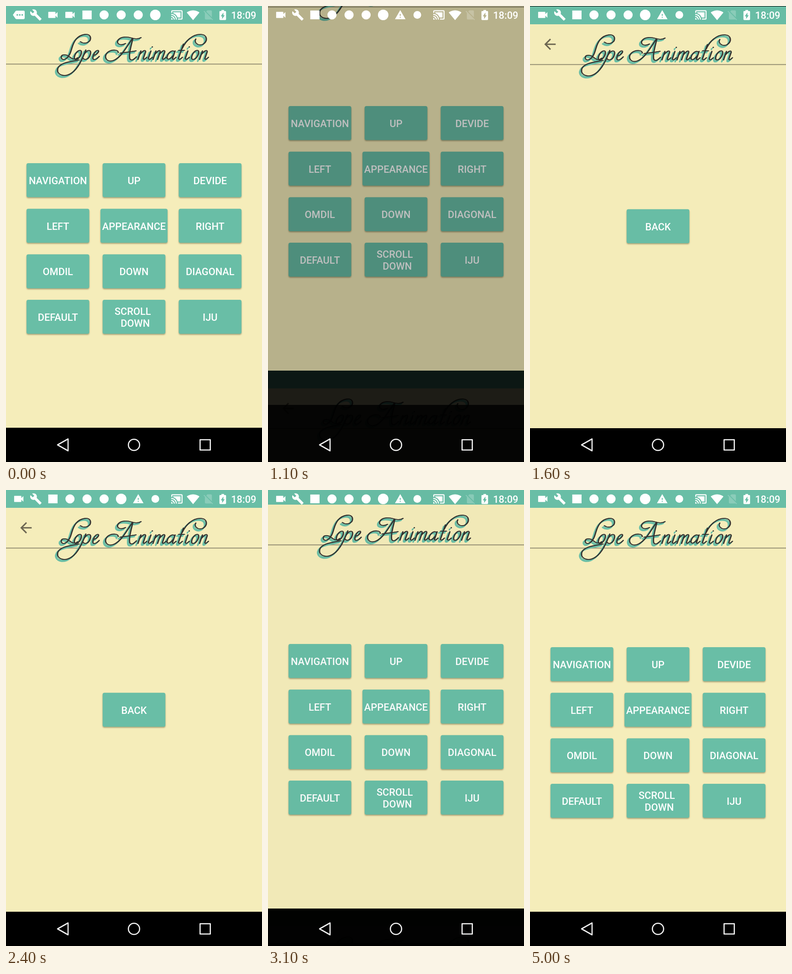
Animation of 561 by 998 pixels, one loop 5.1 s. Source, as an HTML page with a canvas:

```html
<!DOCTYPE html>
<html lang="en">
<head>
<meta charset="utf-8">
<title>Slide transition</title>
<style>
  html, body { margin: 0; width: 100%; height: 100%; overflow: hidden; background: #000; }
  canvas { display: block; width: 561px; height: 998px; }
</style>
</head>
<body>
<canvas id="stage" width="561" height="998"></canvas>
<script>
const W = 561, H = 998, NAV_Y = 923, LOOP = 5100, STEP = 100;
const CREAM = '#f5edba', TEAL = '#69bea6', INK = '#343230';
const FONT = '500 21.8px Roboto, sans-serif';
const stage = document.getElementById('stage').getContext('2d');

const ICONS = {
  video: 'M17 10.5V7c0-.55-.45-1-1-1H4c-.55 0-1 .45-1 1v10c0 .55.45 1 1 1h12c.55 0 1-.45 1-1v-3.5l4 4v-11z',
  tool: 'M22.7 19l-9.1-9.1c.9-2.3.4-5-1.5-6.9-2-2-5-2.4-7.4-1.3L9 6 6 9 1.6 4.7C.4 7.1.9 10.1 2.9 12.1c1.9 1.9 4.6 2.4 6.9 1.5l9.1 9.1c.4.4 1 .4 1.4 0l2.3-2.3c.5-.4.5-1.1.1-1.4z',
  more: 'M22 3.5H7L5.4 4.4 0 12l5.4 7.6 1.6.9H22q2 0 2-2v-13q0-2-2-2zM7.5 10.5h3v3h-3zM12.5 10.5h3v3h-3zM17.5 10.5h3v3h-3z',
  warn: 'M1 21h22L12 2zM13 18h-2v-2h2zM13 14h-2v-4h2z',
  square: 'M3 3.5H21V20.5H3z',
  cast: 'M21 3H3c-1.1 0-2 .9-2 2v3h2V5h18v14h-7v2h7c1.1 0 2-.9 2-2V5c0-1.1-.9-2-2-2zM1 18v3h3c0-1.66-1.34-3-3-3zM1 14v2c2.76 0 5 2.24 5 5h2c0-3.87-3.13-7-7-7zM1 10v2c4.97 0 9 4.03 9 9h2c0-6.08-4.93-11-11-11zM19 7H5v1.63c3.96 1.28 7.09 4.41 8.37 8.37H19z',
  wifi: 'M12 21.5L23.6 7C23.2 6.7 18.7 3 12 3S.8 6.7.4 7z',
  noSim: 'M19 5c0-1.1-.9-2-2-2h-7L7.66 5.34 19 16.68zM3.65 3.88L2.38 5.15 5 7.77V19c0 1.1.9 2 2 2h10l1-.26 1.88 1.88 1.27-1.27z',
  battery: 'M15.7 4H14V2h-4v2H8.3Q7 4 7 5.3v15.4Q7 22 8.3 22h7.4Q17 22 17 20.7V5.3Q17 4 15.7 4zM11 20v-5.5H9L13 7v5.5h2z',
  arrow: 'M20 11H7.83l5.59-5.59L12 4l-8 8 8 8 1.41-1.41L7.83 13H20z'
};
for (const k in ICONS) ICONS[k] = new Path2D(ICONS[k]);

// Script letters: upright, baseline at 0, slanted when drawn
const SCRIPT = {
  o: 'M8-20C-1-20-2 0 6 0C15 0 16-20 8-20',
  e: 'M1-9C10-10 12-20 7-20C0-20-1 0 6 0C10 0 13-3 15-7',
  n: 'M0 0V-19M0-11C3-18 9-23 11-17V-4C11 1 14 1 18-5',
  i: 'M2-19V-4C2 1 6 1 10-5M2-27V-28',
  m: 'M0 0V-19M0-11C3-18 8-23 10-17V0M10-11C13-18 18-23 20-17V-4C20 1 23 1 27-5',
  a: 'M14-17C5-23 0-13 1-6C2 2 9 1 14-10M14-19V-4C14 1 17 1 21-5',
  t: 'M4-34V-4C4 1 8 1 12-5M-2-20H11'
};
const WORD = [['o', 147], ['e', 187], ['n', 289], ['i', 309], ['m', 322],
              ['a', 350], ['t', 373], ['i', 390], ['o', 404], ['n', 424]];
const SWASHES = [
  // L
  'M163 78C173 85 187 79 185 68C182 58 164 61 154 72C143 85 145 98 138 108C133 117 123 120 121 113C120 105 131 105 139 111C146 117 152 118 157 113',
  // p
  'M175 96C168 114 158 138 143 147C130 156 111 152 113 138C116 124 140 122 160 118M171 106C178 94 188 95 185 105C182 117 172 120 168 113',
  // A
  'M262 82C250 88 240 82 246 74C252 66 266 67 276 70C285 73 291 72 296 69M277 71C265 88 254 110 238 118C222 126 212 112 222 102C231 94 246 95 246 102M278 71C274 88 269 104 271 115C274 121 281 117 286 111M250 103C260 101 271 101 285 98',
  // loop over the ending
  'M386 93C394 76 408 62 426 62C442 62 443 78 431 84C420 88 411 79 416 72'
];

const logo = new Path2D();
for (const [c, x] of WORD) {
  logo.addPath(new Path2D(SCRIPT[c]), new DOMMatrix([1, 0, -0.35, 1, x, 117]));
}
for (const d of SWASHES) logo.addPath(new Path2D(d));

function drawLogo(g) {
  g.lineCap = g.lineJoin = 'round';
  const pass = (dx, dy, color, width) => {
    g.save();
    g.translate(dx, dy);
    g.strokeStyle = color;
    g.lineWidth = width;
    g.stroke(logo);
    g.restore();
  };
  pass(-4, 4, TEAL, 3.2);
  pass(-2, 2, TEAL, 2.2);
  // two thin passes give the downstrokes more weight
  pass(-0.5, 0, INK, 1.7);
  pass(0.6, 0.2, INK, 1.7);
}

function icon(g, name, x, y, sx, sy = sx) {
  g.save();
  g.translate(x, y);
  g.scale(sx, sy);
  g.translate(-12, -12);
  g.fill(ICONS[name], 'evenodd');
  g.restore();
}

function disc(g, x, y, r) {
  g.beginPath();
  g.arc(x, y, r, 0, 7);
  g.fill();
}

function button(g, cx, cy, label, w = 137.5) {
  g.save();
  g.shadowColor = 'rgba(60,45,10,.4)';
  g.shadowBlur = 3;
  g.shadowOffsetY = 2;
  g.fillStyle = TEAL;
  g.beginPath();
  g.roundRect(cx - w / 2, cy - 37.5, w, 74.5, 4);
  g.fill();
  g.restore();
  g.fillStyle = '#fff';
  const lines = label.split('\n');
  lines.forEach((s, i) => g.fillText(s, cx, cy + 8.3 + (i - (lines.length - 1) / 2) * 25.6));
}

function makePage(content) {
  const c = document.createElement('canvas');
  c.width = W;
  c.height = H;
  const g = c.getContext('2d');
  const rect = (color, y, h) => { g.fillStyle = color; g.fillRect(0, y, W, h); };
  rect(CREAM, 0, H);
  rect(TEAL, 0, 39);
  rect('#a19b7d', 126, 2);
  rect('rgba(120,110,70,.15)', 128, 1);
  rect('#000', NAV_Y, H - NAV_Y);
  drawLogo(g);
  g.font = FONT;
  g.textAlign = 'center';
  content(g);
  return c;
}

const LABELS = ['NAVIGATION', 'UP', 'DEVIDE', 'LEFT', 'APPEARANCE', 'RIGHT',
                'OMDIL', 'DOWN', 'DIAGONAL', 'DEFAULT', 'SCROLL \n DOWN', 'IJU'];
const menu = makePage(g => LABELS.forEach((s, i) =>
  button(g, 113.7 + (i % 3) * 166.8, 381.5 + Math.floor(i / 3) * 99.7, s, i === 4 ? 147 : 137.5)));
const detail = makePage(g => {
  g.fillStyle = '#6d6752';
  icon(g, 'arrow', 43.8, 82.8, 1.56);
  button(g, 280.5, 481.3, 'BACK');
});

const FIRST = ['more', 'tool', 'video', 'video', 'square', 10, 10, 10, 11.5];
const LATER = ['video', 'tool', 'square', 10, 10, 10, 11.5, 'warn', 8.5];
const SIZE = { warn: 1.05, more: 1.08 };

function drawSystemBars(g, t) {
  g.fillStyle = '#fff';
  (t < 100 ? FIRST : LATER).forEach((it, i) => {
    const x = 28 + i * 37.4;
    if (typeof it === 'number') disc(g, x, 19.5, it);
    else icon(g, it, x, 19.5, SIZE[it] || 1.13);
  });
  icon(g, 'cast', 374.5, 19.5, 1.13);
  icon(g, 'wifi', 410, 20, 1.2, 1.17);
  icon(g, 'battery', 475, 19.8, 1.45, 1.1);
  g.globalAlpha = 0.22;
  icon(g, 'noSim', 443.5, 19.5, 1.1);
  g.globalAlpha = 1;
  g.font = FONT;
  g.textAlign = 'right';
  g.fillText('18:09', 548.5, 27.5);

  g.strokeStyle = '#f0f0f0';
  g.lineWidth = 2.6;
  g.lineJoin = 'round';
  g.stroke(new Path2D('M113 960.5L136 947.5V973.5z'));
  g.beginPath();
  g.arc(280.5, 960.5, 12.3, 0, 7);
  g.stroke();
  g.strokeRect(425.3, 949.3, 22.4, 22.4);
}

function ease(u) {
  u = Math.min(1, Math.max(0, u));
  return (1 - Math.cos(Math.PI * u)) / 2;
}

// 0 = menu, 1 = detail
const progress = t => t < 2000 ? ease((t - 936.6) / 681.5) : 1 - ease((t - 2438.8) / 700);

function layer(g, page, y, alpha, top, bottom) {
  g.save();
  g.beginPath();
  g.rect(0, top, W, bottom - top);
  g.clip();
  g.globalAlpha = alpha;
  g.drawImage(page, 0, y);
  g.restore();
}

function draw(t) {
  const g = stage, p = progress(t), q = 1 - p;
  const shift = Math.ceil(p * NAV_Y), seam = NAV_Y - shift, tail = H - shift;
  g.fillStyle = '#000';
  g.fillRect(0, 0, W, H);
  if (p < 1) layer(g, menu, -shift, q * q, 0, H);
  if (p > 0) {
    // slightly brighter where it overlaps the end of the menu page
    layer(g, detail, seam, p * p + p * q * q, seam, tail);
    layer(g, detail, seam, p * p, tail, H);
  }
  drawSystemBars(g, t);
}

const start = performance.now();
function tick() {
  const t = (performance.now() - start) % LOOP;
  draw(Math.floor(t / STEP) * STEP);
  requestAnimationFrame(tick);
}
tick();
</script>
</body>
</html>
```
